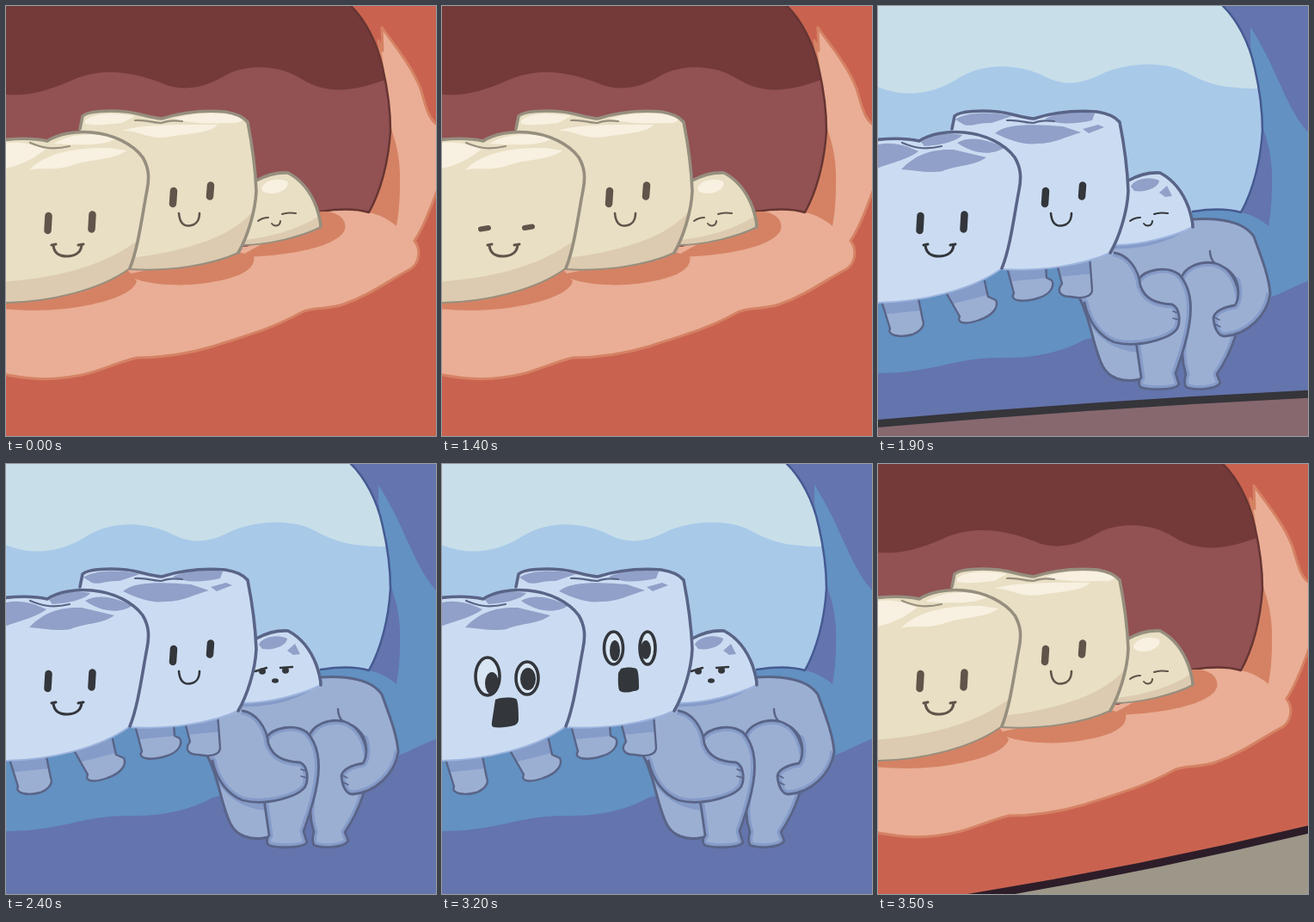
Write an HTML page with a canvas that moves like this. It is 500 px wide and 500 px high and loops after 3.6 s.

```html
<!DOCTYPE html>
<html lang="en">
<head>
<meta charset="utf-8">
<title>Teeth</title>
<style>
  html, body { margin: 0; width: 100%; height: 100%; overflow: hidden; background: #c96350; }
  canvas { display: block; width: 100vw; height: 100vh; }
</style>
</head>
<body>
<canvas id="stage" width="500" height="500"></canvas>
<script>
const ctx = document.getElementById('stage').getContext('2d');
ctx.lineCap = ctx.lineJoin = 'round';

const LOOP = 3600, STEP = 100;

const WARM = {
  back: '#c96350', gum: '#e9ae95', edge: '#d58264', wedge: '#d58264',
  far: '#733a39', near: '#925153', rim: '#663532',
  tooth: '#e8dfc4', shade: '#dccbb0', shine: '#f8f0e0', line: '#968e7e', base: '#968e7e', ink: '#61544a',
  wave: 'M-5 102C30 108 60 93 85 83C120 70 160 80 190 93C215 100 238 91 258 79C285 66 322 70 344 85C370 101 400 103 450 82V-5H-5Z'
};
const XRAY = {
  back: '#6474ad', gum: '#6291c2', edge: '#6291c2', wedge: '#6474ad',
  far: '#c8dfe9', near: '#a9c9e9', rim: '#455a91',
  tooth: '#cbdcf2', shade: '#cbdcf2', shine: '#90a0c8', line: '#596487', base: '#9db4de', ink: '#33363b',
  body: '#9bafd3', bodyShade: '#859bc8',
  wave: 'M-5 92C30 108 65 103 95 83C125 66 160 67 190 80C212 92 232 93 258 80C292 64 335 64 360 78C390 95 415 96 450 96V-5H-5Z'
};
const XRAY_DIM = { ...XRAY, near: '#b5c2d8', far: '#c3d8e8' };

const CAVITY_RIM = 'M398 -3C418 15 432 44 438 72C444 98 447 122 447 145C445 180 436 215 422 240C405 235 385 236 366 239';
const CAVITY = CAVITY_RIM + 'L280 280H-5V-5Z';
const CHEEK = 'M437 25C452 46 472 70 482 96C488 115 491 134 505 140V204C496 230 486 257 475 273C483 283 481 299 470 306C445 319 424 336 392 347C375 353 355 350 344 356C310 375 280 383 240 396C210 405 178 409 152 409C120 417 105 428 70 432C40 436 18 432 -5 428V230H420C440 190 450 140 433 40L438 52Z';
const XRAY_GUM = 'M433 24C444 42 454 60 462 79C474 104 484 132 505 152V318C485 325 465 337 450 341L240 388C215 402 185 409 150 409C112 408 90 415 60 421C35 426 15 427 -5 427V230H420C440 190 450 140 433 45Z';
const WEDGE = 'M448 143C456 165 459 185 458 210C458 230 456 245 454 256C445 248 433 242 422 240C437 212 446 180 448 143Z';
const SHADOWS = 'M366 239C386 238 397 248 394 260C386 280 330 291 270 292ZM288 291C292 309 262 320 215 324C180 326 150 320 140 312L270 286ZM152 320C148 336 110 347 70 352C40 355 18 354 -5 352V335L140 305Z';

// Each outline is a heavy top and a thin base that continues it.
const TEETH = [
  {
    top: 'M291 203C302 197 315 193 328 194C345 203 355 218 361 234C364 243 366 250 366 257',
    base: '366 257C345 268 305 278 275 278',
    shade: 'M366 257C345 268 305 278 275 278L278 272C310 268 340 260 364 244Z',
    shine: 'M297 212C300 203 315 199 327 204C330 212 318 219 306 218C300 217 297 215 297 212Z',
    patch: 'M294 210C297 202 315 197 327 203C326 212 310 217 298 215ZM327 217L336 209L342 221L334 222Z'
  },
  {
    top: 'M86 143L89 128C95 122 120 121 140 123C156 125 168 130 181 131C203 124 230 121 255 123C268 125 276 129 281 135C286 160 290 190 291 215C290 240 280 270 270 287',
    base: '270 287C240 301 190 309 143 306L100 220',
    shade: 'M289 236C268 265 215 285 145 293V306C190 309 240 301 270 287C280 270 287 252 289 236Z',
    shine: 'M92 133C100 125 125 123 150 128L135 136C120 137 105 140 92 137ZM195 131C220 123 250 123 274 128C277 133 272 137 262 136C240 137 215 137 195 131ZM135 145C155 137 210 138 246 138C240 147 215 148 190 152C165 156 158 145 135 145Z',
    patch: 'M90 132C100 124 130 122 156 128L132 136C115 135 110 141 100 138ZM194 131C215 122 235 122 252 125L249 133C230 137 210 139 194 131ZM136 148C150 135 190 138 215 140L236 147C218 152 205 160 185 160C170 162 155 157 136 148ZM238 143L256 138L263 141L245 148Z',
    groove: 'M150 133C162 132 172 136 181 136C190 132 198 133 205 134'
  },
  {
    top: 'M-5 156C18 153 35 154 48 157C60 149 80 145 100 147C125 149 148 161 159 176C166 188 167 199 164 214C158 245 154 280 144 305',
    base: '144 305C110 330 50 345 -5 345',
    shade: 'M153 273C115 300 70 315 -5 321V345C50 345 110 330 144 305Z',
    shine: 'M-5 160C15 156 30 160 46 167C35 174 25 184 -5 190ZM55 160C75 148 105 146 128 154C115 163 85 162 55 160ZM27 191C45 170 85 164 120 165L140 168C128 179 95 178 75 186C55 192 40 187 27 191Z',
    patch: 'M-5 162C15 157 30 161 47 169C35 178 20 181 -5 190ZM50 158C65 149 80 147 98 150C92 158 70 162 54 163ZM92 159C108 150 130 156 146 165C135 173 113 174 92 159ZM27 190C45 171 65 166 88 167L126 176C110 187 95 184 75 192C60 195 42 191 27 190Z',
    groove: 'M28 159C40 164 52 168 74 163'
  }
];

const LEGS = [
  'M4 343L14 375C10 383 25 386 40 382C50 378 55 371 52 365L47 340',
  'M79 333L95 361C91 369 102 371 118 365C133 360 141 350 137 342L128 338L124 320',
  'M150 304L158 334C152 343 168 345 185 340C200 336 206 326 202 319L196 316L195 302',
  'M208 300L214 323C208 330 210 338 224 338C238 341 249 338 249 330L246 290'
];
const TORSO = 'M270 278C300 277 340 268 366 248C395 246 425 250 437 268C445 290 455 315 456 335C452 360 425 385 400 384L350 392L304 434C283 439 268 431 262 420C250 398 248 365 234 339L240 300Z';
const TORSO_LINE = 'M366 248C395 246 425 250 437 268C445 290 455 315 456 335M304 434C283 439 268 431 262 420C250 398 248 365 234 339';
// Limbs from back to front: visible outline, closed where it is filled.
const LIMBS = [
  'M352 318C356 303 375 296 392 299C410 304 419 322 421 345C423 368 412 402 394 428L398 438C393 447 366 447 358 443C355 437 357 432 358 428C352 410 353 395 357 380',
  'M303 318C310 307 335 301 350 312C362 325 366 345 362 370C358 395 350 415 346 427L350 440C345 447 315 447 305 443C302 438 304 434 306 432L300 390',
  'M275 287C290 289 303 305 305 325C310 340 322 346 342 347C351 351 352 366 348 375C340 387 302 398 275 391C257 384 245 367 240 345',
  'M413 313C420 322 421 340 415 348C402 350 391 355 390 363C391 374 395 384 403 384C430 382 452 360 456 335'
];

const fill = (path, color) => { ctx.fillStyle = color; ctx.fill(new Path2D(path)); };
const stroke = (path, color, width) => {
  ctx.strokeStyle = color; ctx.lineWidth = width; ctx.stroke(new Path2D(path));
};
function oval(x, y, rx, ry, color, line) {
  ctx.beginPath();
  ctx.ellipse(x, y, rx, ry, 0, 0, Math.PI * 2);
  ctx.fillStyle = color;
  ctx.fill();
  if (line) { ctx.strokeStyle = line; ctx.lineWidth = 3.6; ctx.stroke(); }
}
function clipped(path, draw) {
  ctx.save();
  ctx.clip(new Path2D(path));
  draw();
  ctx.restore();
}

// lid: 0 open, 1 half closed, 2 closed
function eye(x, y, height, lid, ink) {
  const bottom = y + height / 2;
  if (lid === 2) return stroke(`M${x - 4} ${y + 7}L${x + 5} ${y + 5.5}`, ink, 6);
  const top = lid ? y - height / 2 + 7 : y - height / 2 + 4;
  stroke(`M${x + .5} ${top}L${x - .5} ${bottom - 4}`, ink, 8.5);
  if (lid) stroke(`M${x - 4} ${top - 1}L${x + 5} ${top - 2}`, ink, 4);
}

function smiles(p, lids) {
  eye(49, 252.5, 25, lids[0], p.ink);
  eye(100, 251, 25, lids[0], p.ink);
  stroke('M53 278L58 277M84 278L90 277M55 278C56 288 62 291 71 291C80 291 87 287 88 278', p.ink, 3);
  eye(194.5, 222.5, 23, lids[1], p.ink);
  eye(237.5, 215, 21, lids[1], p.ink);
  stroke('M201 241C202 252 207 256 213 255.5C220 255 225 250 225 241', p.ink, 2.6);
}

function shock(p, size) {
  const wideEye = (x, y, rx, ry, px, py, prx, pry) => {
    oval(x, y, rx, ry * size, '#d8e5f3', p.ink);
    oval(px, py, prx, pry * size, p.ink);
  };
  wideEye(53, 247, 14, 22, 58, 255, 8, 13);
  wideEye(99, 249, 13, 19, 100, 250, 9, 13);
  wideEye(199.5, 214, 11, 19, 201, 217, 6, 12);
  wideEye(239, 214, 9, 19, 237, 216, 6, 11);
  fill('M62 274C70 271 80 271 86 273Q89 275 89 297Q89 302 84 304C76 306 67 307 60 306Q57 305 58 300Z', p.ink);
  fill('M208 238C214 236 221 236 226 238Q229 240 229 261Q228 264 223 264C216 266 211 266 207 264Q204 262 205 243Z', p.ink);
}

function sleepy(p) {
  stroke('M293 250C297 247 300 246 305 246M321 242C326 240 331 240 337 241M309 253C312 257 319 256 319 250', p.ink, 2);
}
function grumpy(p) {
  stroke('M290 241L303 237M319 237L333 236', p.ink, 2.4);
  oval(298, 241, 4, 3.8, p.ink);
  oval(325, 240, 4, 3.8, p.ink);
  oval(313, 252, 4, 2.8, p.ink);
}

function drawBody(p) {
  fill(TORSO, p.body);
  clipped(TORSO, () => {
    stroke('M240 345C250 375 270 396 305 398', p.bodyShade, 10);
    stroke('M270 280C310 282 340 273 366 253', p.bodyShade, 4);
  });
  stroke(TORSO_LINE, p.line, 3);
  for (const limb of LIMBS) {
    fill(limb, p.body);
    clipped(limb, () => stroke(limb, p.bodyShade, 9));
    stroke(limb, p.line, 2.8);
  }
  stroke('M386 285C386 291 388 295 391 299M401 303C406 305 410 309 413 313', p.line, 2.4);
  stroke('M343 355L349 357M343 363L350 365M391 362L397 365M392 370L398 373', p.line, 1.6);
  for (const leg of LEGS) {
    fill(leg, p.body);
    clipped(leg, () => stroke('M0 350L60 344M75 340L130 326M145 312L250 302', p.bodyShade, 18));
    stroke(leg, p.line, 2.4);
  }
}

function drawTooth(tooth, p) {
  const shape = `${tooth.top}L${tooth.base}`;
  fill(shape, p.tooth);
  clipped(shape, () => {
    fill(tooth.shade, p.shade);
    fill(p.body ? tooth.patch : tooth.shine, p.shine);
  });
  if (tooth.groove) stroke(tooth.groove, p.line, 2.2);
  stroke('M' + tooth.base, p.base, 2);
  stroke(tooth.top, p.line, 3.6);
}

function drawScene(p, faces) {
  const xray = Boolean(p.body);
  ctx.fillStyle = p.back;
  ctx.fillRect(0, 0, 500, 500);
  const gum = xray ? XRAY_GUM : CHEEK;
  fill(gum, p.gum);
  if (!xray) stroke(gum, p.edge, 3);
  clipped(CAVITY, () => {
    ctx.fillStyle = p.near;
    ctx.fillRect(0, 0, 500, 300);
    fill(p.wave, p.far);
  });
  fill(WEDGE, p.wedge);
  stroke(CAVITY_RIM, p.rim, 2.5);
  if (xray) drawBody(p);
  else fill(SHADOWS, p.edge);
  for (const tooth of TEETH) drawTooth(tooth, p);

  if (faces.shock) shock(p, faces.shock);
  else smiles(p, faces.lids);
  if (faces.awake) grumpy(p);
  else sleepy(p);
}

// The upper scene slides down over the lower one behind a dark bar.
function wipe(lower, upper, [left, middle, right], bar) {
  const edge = `M-5 ${left}Q250 ${2 * middle - (left + right) / 2} 505 ${right}`;
  lower();
  clipped(`${edge}V-5H-5Z`, upper);
  stroke(edge, bar, 9);
}
const flat = color => () => { ctx.fillStyle = color; ctx.fillRect(0, 0, 500, 500); };

const FIRST_LIDS = '01221012100122210';
const SECOND_LIDS = '0000000122210';

function render(step) {
  const faces = {
    lids: [+(FIRST_LIDS[step] || 0), +(SECOND_LIDS[step] || 0)],
    awake: step >= 24 && step < 35,
    shock: step < 26 || step > 34 ? 0 : Math.min(1, .6 + (step - 26) * .2)
  };
  const warm = () => drawScene(WARM, faces);
  const xray = () => drawScene(XRAY, faces);
  switch (step) {
    case 18: return wipe(warm, xray, [106, 84, 66], '#35343a');
    case 19: return wipe(flat('#87686f'), xray, [486, 466, 451], '#35353a');
    case 34: return wipe(() => drawScene(XRAY_DIM, faces), warm, [102, 70, 41], '#421416');
    case 35: return wipe(flat('#9c9788'), warm, [521, 479, 424], '#2d1d29');
  }
  if (step > 19) xray();
  else warm();
}

function frame() {
  render(Math.floor(performance.now() % LOOP / STEP));
  requestAnimationFrame(frame);
}
frame();
</script>
</body>
</html>
```
